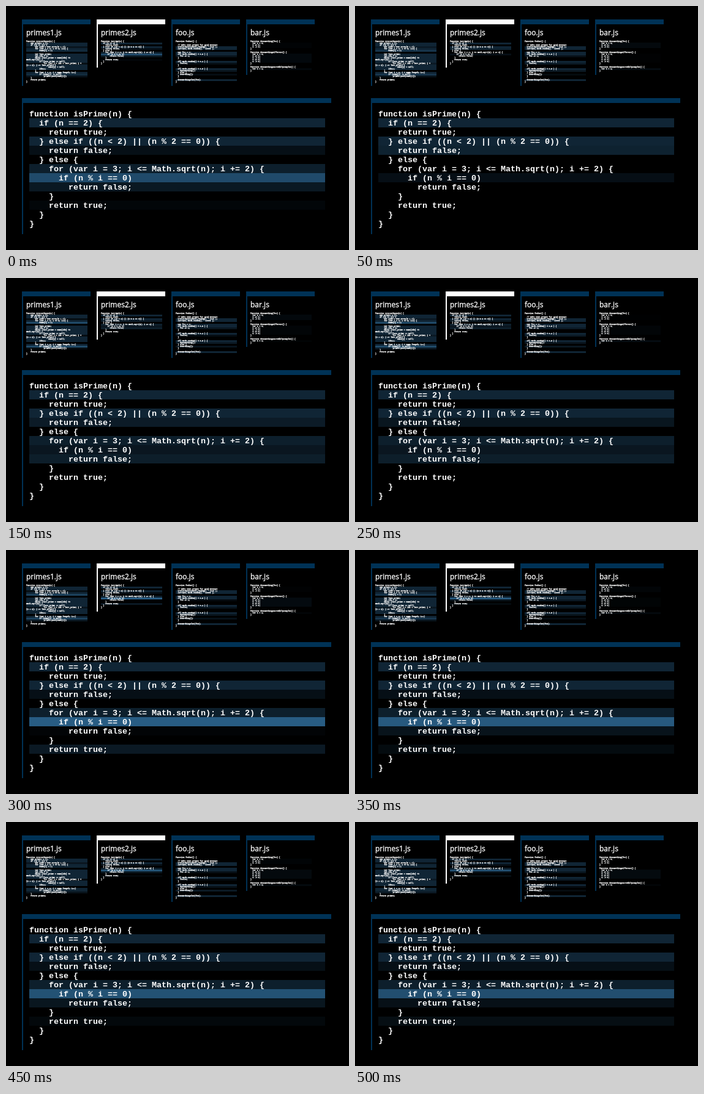
An HTML page that plays this animation: 560x400 px, repeating every 550 ms.

```html
<!DOCTYPE html>
<html lang="en">
<head>
<meta charset="utf-8">
<title>Code heat map</title>
<style>
  html, body { margin: 0; width: 100%; height: 100%; overflow: hidden; background: #000; }
  body { position: relative; color: #fff; }
  .panel {
    position: absolute; box-sizing: border-box;
    border: solid #003256; border-width: 8px 0 0 2px;
  }
  .thumb { top: 22px; width: 112px; }
  .active { border-color: #fff; }
  .main { left: 26px; top: 151px; width: 505px; height: 223px; }
  .title {
    position: absolute; left: 5px; top: 6px;
    font: 12px/16px "Open Sans", sans-serif; -webkit-text-stroke: .3px;
  }
  .code {
    position: absolute; left: 5px; top: 27px; width: 100px;
    font: bold 3px/3px "Liberation Mono", "Courier New", monospace;
    white-space: pre; -webkit-text-stroke: .25px;
  }
  .main .code {
    left: 10px; top: 10px; width: 483px;
    font-size: 13.333px; line-height: 15px; -webkit-text-stroke: 0;
  }
  .thumb .row { height: 3px; }
  .main .row { height: 15px; }
  .row span { position: relative; }
  .main span { top: 1px; }
</style>
</head>
<body>
<script>
const STEP = 50, STEPS = 11;

const primes1 = `function eratosthenes(n) {
    var primes = [];
    if ((n >= 2)) {
        var nums = new Array(n + 1);
        for (var i = 0; i <= n; i++) {
            nums[i] = i;

        var last_prime;
        var idx = 2;
        while (last_prime = nums[idx] <=
Math.sqrt(n)) {
            if (last_prime != null)
                for (var j = idx + last_prime; j <
(n + 1); j += last_prime) {
                    nums[j] = null;
            idx++;
        }
        for (var i = 0; i < nums.length; i++)
            if (nums[i] != null)
                primes.push(nums[i]);
    }
    return primes;
}`;

const primes2 = `function isPrime(n) {
  if (n == 2) {
    return true;
  } else if ((n < 2) || (n % 2 == 0)) {
    return false;
  } else {
    for (var i = 3; i <= Math.sqrt(n); i += 2) {
      if (n % i == 0)
        return false;
    }
    return true;
  }
}`;

const foo = `function foobar() {

  // make some primes for good measure
  eratosthenes(Math.random() * 1000 );
  isPrime( Math.random() * 10000 );

  var foo = 0;
  if( Math.random() < 0.5 ) {
    foo += 1;
  }

  if( Math.random() < 0.1 ) {
    foofoo;
  }

  if( Math.random() < 0.5 ) {
    doSomething();
  } else {
    doNothing();
  }

  doSomethingElse(foo);
}`;

const bar = `function doSomething(foo) {
  var a = 0;
  a += 5;
  a -= 5;
}

function doSomethingDifferent() {
  var a = 0;
  a += 5;
  a -= 5;
  a += 5;
  a -= 5;
}

function doSomethingIncrediblyComplex() {
  var a = 1;
}`;

const COLD = /^\s*(\}?$|\} else \{|function|return|\/\/)/;
const BRANCH = /^\s*(if|\} else \{)/;
const LOOP = /^\s*for/;
const WARM = .36;

// Repeatable noise from 0 to 1.
function noise(a, b) {
  const x = Math.sin(a * 12.9898 + b * 78.233 + 1) * 43758.5453;
  return x - Math.floor(x);
}

// Statements are warm, loop bodies pulse, branch bodies flicker.
function lineHeat(lines, i, step) {
  const prev = lines[i - 1] || "";
  if (COLD.test(lines[i])) return 0;
  if (LOOP.test(prev) && prev.trim().length < 45 && !prev.endsWith("<"))
    return .55 + .2 * Math.cos(2 * Math.PI * (step - 4) / STEPS);
  if (BRANCH.test(prev)) return .08 + .18 * noise(i, step);
  return WARM;
}

// The loop runs hot for six steps, then goes quiet and slowly recovers.
function primeHeat(lines, i, step) {
  const since = (step + 5) % STEPS;
  const hot = since < 6;
  const calm = hot ? 1 : Math.min(1, (since - 6) / 2);
  const primes = hot ? .85 * Math.cos(Math.PI * since / 4) ** 2 * .86 ** since : 0;
  switch (i) {
    case 4: return hot ? .15 : .33 * .9 ** (since - 6);
    case 6: return .3 * calm;
    case 7: return hot ? .9 - .035 * since : .14 + .08 * calm;
    case 8: return .29 * calm * (1 - primes);
    case 10: return .29 * primes;
    default: return lineHeat(lines, i, step);
  }
}

// Each function is called now and then, lighting its whole body.
function callHeat(lines, i, step) {
  const group = lines.slice(0, i).filter(s => s.startsWith("function")).length;
  return COLD.test(lines[i]) ? 0 : .12 * noise(group, step);
}

const files = [
  { name: "primes1.js", source: primes1, heat: lineHeat },
  { name: "primes2.js", source: primes2, heat: primeHeat, active: true },
  { name: "foo.js", source: foo, heat: lineHeat },
  { name: "bar.js", source: bar, heat: callHeat }
];
const rows = [];

function add(parent, cls, text = "", tag = "div") {
  const el = document.createElement(tag);
  el.className = cls;
  el.textContent = text;
  parent.append(el);
  return el;
}

function addCode(panel, { source, heat }) {
  const code = add(panel, "code");
  const lines = source.split("\n");
  lines.forEach((line, i) => {
    const row = add(code, "row");
    add(row, "", line, "span");
    rows.push({ row, heatAt: step => heat(lines, i, step) });
  });
  return lines.length;
}

files.forEach((file, i) => {
  const panel = add(document.body, "panel thumb" + (file.active ? " active" : ""));
  add(panel, "title", file.name);
  const count = addCode(panel, file);
  panel.style.left = 26 + 122 * i + "px";
  panel.style.height = 40 + 3 * count + "px";
});
addCode(add(document.body, "panel main"), files.find(f => f.active));

let shown = -1;
function draw() {
  const step = Math.floor(performance.now() / STEP) % STEPS;
  if (step !== shown) {
    shown = step;
    for (const { row, heatAt } of rows)
      row.style.background = `rgba(45, 103, 146, ${heatAt(step).toFixed(3)})`;
  }
  requestAnimationFrame(draw);
}
draw();
</script>
</body>
</html>
```
